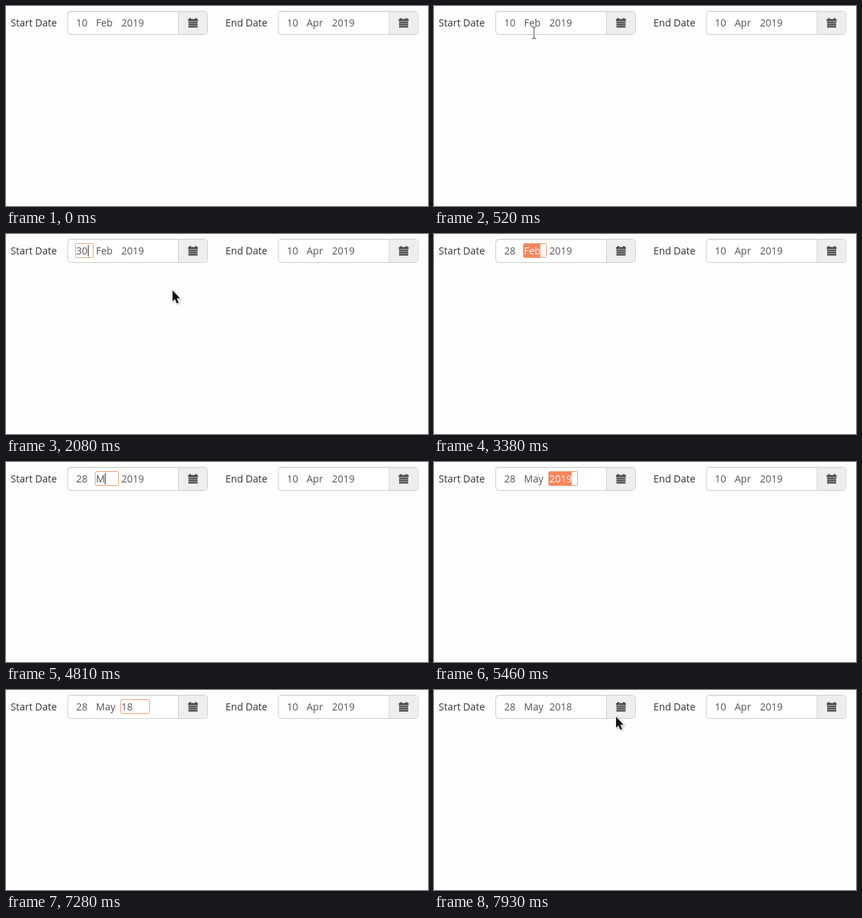
An HTML page with a canvas that plays this animation: 598 px wide and 284 px high, repeating every 8 s.

```html
<!DOCTYPE html>
<html lang="en">
<head>
<meta charset="utf-8">
<title>Date range</title>
<style>
  html, body { margin: 0; width: 100%; height: 100%; overflow: hidden; background: #fff; }
  canvas { display: block; width: 598px; height: 284px; }
</style>
</head>
<body>
<canvas id="stage"></canvas>
<script>
const W = 598, H = 284, LOOP = 8000, STEP = 130;
const canvas = document.getElementById('stage');
const ctx = canvas.getContext('2d', { alpha: false });
const ratio = window.devicePixelRatio || 1;
canvas.width = W * ratio;
canvas.height = H * ratio;

const FONT = '14px "Open Sans", sans-serif';
const CORAL = '#fb845b';

// Offset and width of the day, month and year inputs within a field.
const PARTS = [[12, 25], [40, 33], [76, 41]];

// Each state lasts until the next; focus is the index of the active part.
const STATES = [
  { at: 0, values: ['10', 'Feb', '2019'] },
  { at: 1040, values: ['10', 'Feb', '2019'], focus: 0 },
  { at: 1170, values: ['10', 'Feb', '2019'], focus: 0, selected: true },
  { at: 1950, values: ['3', 'Feb', '2019'], focus: 0, caret: true },
  { at: 2080, values: ['30', 'Feb', '2019'], focus: 0, caret: true },
  { at: 2730, values: ['30', 'Feb', '2019'], focus: 0 },
  { at: 3380, values: ['28', 'Feb', '2019'], focus: 1, selected: true },
  { at: 4810, values: ['28', 'M', '2019'], focus: 1, caret: true },
  { at: 5200, values: ['28', 'Ma', '2019'], focus: 1, caret: true },
  { at: 5460, values: ['28', 'May', '2019'], focus: 2, selected: true },
  { at: 6370, values: ['28', 'May', '1'], focus: 2, caret: true },
  { at: 6760, values: ['28', 'May', '18'], focus: 2, caret: true },
  { at: 7280, values: ['28', 'May', '18'], focus: 2 },
  { at: 7670, values: ['28', 'May', '2018'] }
];
const END = { values: ['10', 'Apr', '2019'] };

// Pointer paths: start time, end time, start, control and end points.
const MOVES = [
  [130, 910, 158, 0, 150, 64, 109, 24],
  [1040, 1300, 109, 24, 175, 60, 236, 80],
  [7540, 7930, 236, 80, 240, 86, 258, 38]
];

function text(str, x, color) {
  ctx.font = FONT;
  ctx.fillStyle = color;
  ctx.fillText(str, x, 29);
}

function box(x, y, w, h, r, fill, stroke) {
  ctx.beginPath();
  ctx.roundRect(x, y, w, h, r);
  if (fill) {
    ctx.fillStyle = fill;
    ctx.fill();
  }
  if (stroke) {
    ctx.strokeStyle = stroke;
    ctx.lineWidth = 1;
    ctx.stroke();
  }
}

function calendar(x, y) {
  ctx.fillStyle = '#484848';
  ctx.fillRect(x + 2, y, 2, 2);
  ctx.fillRect(x + 10, y, 2, 2);
  ctx.fillRect(x, y + 1.5, 14, 3);
  for (let row = 0; row < 3; row++) ctx.fillRect(x + 0.5, y + 5.3 + row * 3, 13, 2.3);
}

function field(x, state) {
  box(x + 0.5, 7.5, 198, 33, 4, '#fff', '#ccc');
  box(x + 158, 8, 40, 32, [0, 3, 3, 0], '#eee');
  ctx.fillStyle = '#ccc';
  ctx.fillRect(x + 157, 8, 1, 32);
  ctx.fillStyle = 'rgba(0,0,0,.05)';
  ctx.fillRect(x + 2, 8, 155, 1);
  calendar(x + 171, 17);

  PARTS.forEach(([dx, width], i) => {
    const left = x + dx, value = state.values[i];
    const active = state.focus === i;
    ctx.font = FONT;
    const len = ctx.measureText(value).width;
    if (active) {
      box(left - 0.5, 13.5, width, 20, 2, '#fff', '#e9a176');
      if (state.selected) {
        ctx.fillStyle = CORAL;
        ctx.fillRect(left, 14, len, 19);
      }
    }
    text(value, left + 0.5, active && state.selected ? '#fff' : '#555');
    if (active && state.caret) {
      ctx.fillStyle = '#333';
      ctx.fillRect(Math.round(left + len + 0.5), 16, 1, 16);
    }
  });
}

function polygon(points) {
  ctx.beginPath();
  for (const [x, y] of points) ctx.lineTo(x, y);
  ctx.closePath();
}

function arrow(x, y) {
  ctx.save();
  ctx.translate(x, y);
  polygon([[0, 0], [0, 15.5], [3.4, 12.4], [6, 18.5], [8.6, 17.4], [6, 11.5], [10.5, 11.3]]);
  ctx.shadowColor = 'rgba(0,0,0,.35)';
  ctx.shadowBlur = 3 * ratio;
  ctx.shadowOffsetX = ratio;
  ctx.shadowOffsetY = ratio;
  ctx.strokeStyle = '#fff';
  ctx.lineWidth = 1.6;
  ctx.stroke();
  ctx.shadowColor = 'transparent';
  ctx.fillStyle = '#111';
  ctx.fill();
  ctx.restore();
}

function beam(x, y) {
  ctx.save();
  ctx.translate(x, y);
  ctx.beginPath();
  for (const end of [-1, 1]) {
    ctx.moveTo(-3, end * 8.5);
    ctx.quadraticCurveTo(0, end * 8.5, 0, end * 6.5);
    ctx.quadraticCurveTo(0, end * 8.5, 3, end * 8.5);
  }
  ctx.moveTo(0, -7);
  ctx.lineTo(0, 7);
  for (const [color, width] of [['#fff', 2.8], ['#444', 1]]) {
    ctx.strokeStyle = color;
    ctx.lineWidth = width;
    ctx.stroke();
  }
  ctx.restore();
}

function pointer(t) {
  if (t < 130 || (t >= 3380 && t < 7540)) return;
  const [from, to, x0, y0, x1, y1, x2, y2] = MOVES.findLast(m => t >= m[0]);
  const tick = Math.floor(t / STEP) * STEP;
  const p = Math.min(1, (tick - from) / (to - from));
  const ease = p * p * (3 - 2 * p);
  const bezier = (a, b, c) => (1 - ease) ** 2 * a + 2 * ease * (1 - ease) * b + ease ** 2 * c;
  const x = bezier(x0, x1, x2), y = bezier(y0, y1, y2);
  const overInput = x > 88 && x < 245 && y > 8 && y < 40;
  (overInput ? beam : arrow)(x, y);
}

function draw(t) {
  ctx.setTransform(ratio, 0, 0, ratio, 0, 0);
  ctx.fillStyle = '#fefefe';
  ctx.fillRect(0, 0, W, H);
  text('Start Date', 6.5, '#333');
  text('End Date', 311, '#333');
  field(87, STATES.findLast(s => t >= s.at));
  field(385.5, END);
  pointer(t);
}

const start = performance.now();
function frame() {
  draw((performance.now() - start) % LOOP);
  requestAnimationFrame(frame);
}
frame();
</script>
</body>
</html>
```
